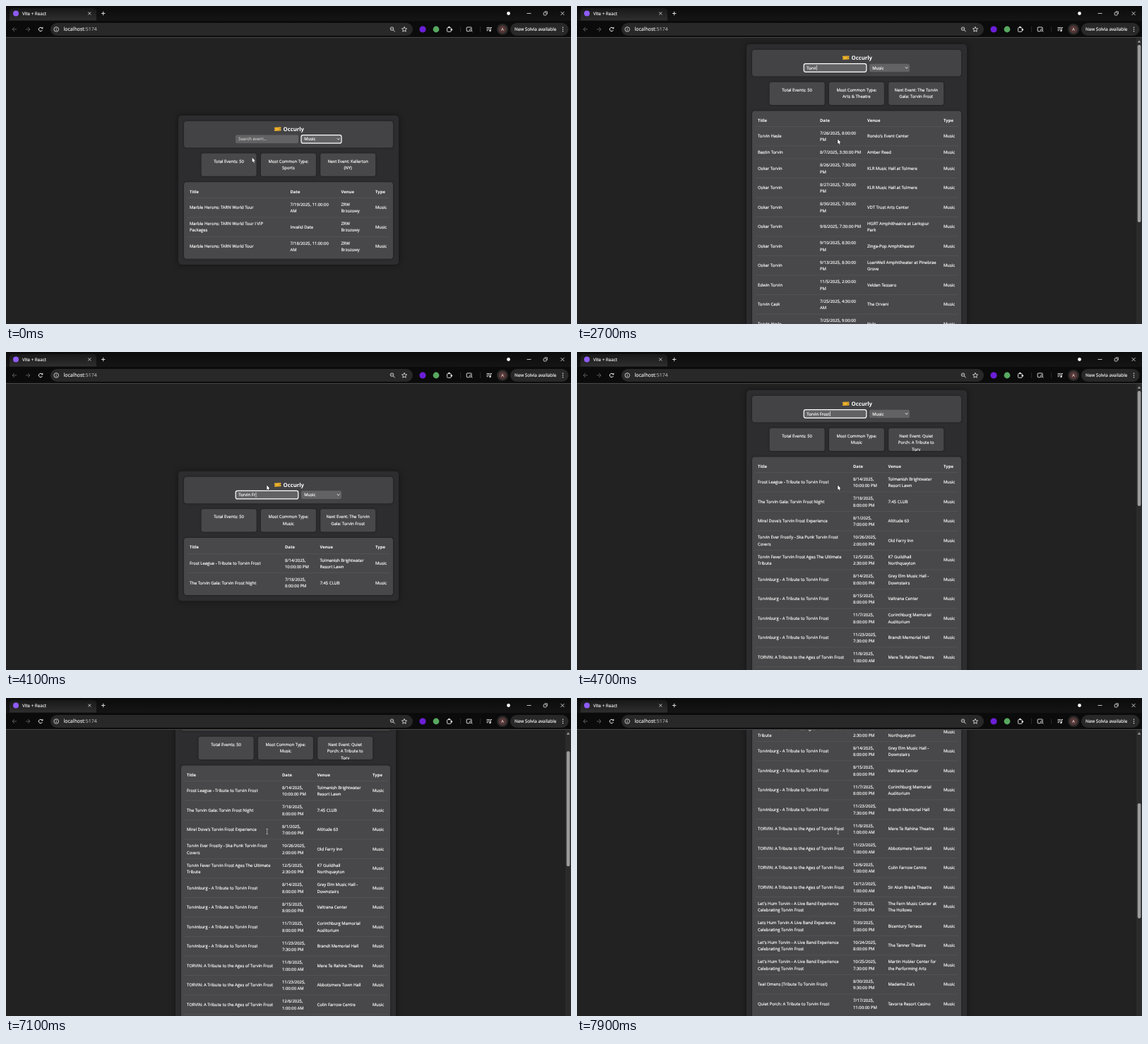
An HTML page with a canvas that plays this animation: 800x450 px, repeating every 8000 ms.

```html
<!DOCTYPE html>
<html lang="en">
<head>
<meta charset="utf-8">
<title>Event search</title>
<style>
html, body { margin: 0; width: 100%; height: 100%; overflow: hidden; background: #222; }
canvas { display: block; width: 800px; height: 450px; }
</style>
</head>
<body>
<canvas id="stage"></canvas>
<script>
const LOOP = 8000, W = 800, H = 450, BAR = 45;
const canvas = document.getElementById('stage');
const c = canvas.getContext('2d');
const dpr = window.devicePixelRatio || 1;
canvas.width = W * dpr;
canvas.height = H * dpr;

// ---------- data: title | date | venue, "~" breaks a line ----------
const fullDate = d => d.replace(/(\d+\/\d+)/, '$1/2025,').replace(/(:\d\d)/, '$1:00');

function parse(src) {
  return src.trim().split('\n').map(row => {
    const [title, date, venue] = row.trim().split('|');
    const cells = [title, fullDate(date), venue, 'Music'].map(s => s.split('~'));
    return { cells, h: cells.some(s => s.length > 1) ? 27.5 : 18 };
  });
}

const tour = 'Marble Herons: TARN World Tour';
const burg = 'Torvinburg - A Tribute to Torvin Frost';
const ages = 'TORVIN: A Tribute to the Ages of Torvin Frost';
const hum = 'Hum Torvin - A Live Band Experience~Celebrating Torvin Frost';

const startRows = parse(`
  ${tour}|7/19 11:00~AM|ZRW~Brzozowy
  ${tour} I VIP~Packages|Invalid Date|ZRW~Brzozowy
  ${tour}|7/18 11:00~AM|ZRW~Brzozowy`);

const letterRows = parse(`
  T Lunafoxy|8/22~2:30 PM|Belvarra Theatre
  Q&T|10/15~2:00 PM|Dunmorrow Depot
  Q&T|10/17~2:00 PM|Northumbria University
  Q&T|10/21~3:00 PM|The Fennel
  Q&T|10/22~2:00 PM|Loomcroft
  Q&T|10/25~2:00 PM|Harrowick Assembly Hall
  TheMURA$k|11/15~7:00 PM|The Lanternry -~Undercroft
  TheMURA$k|11/18~8:00 PM|Grey Elm Music Hall -~Upstairs
  T-Glim|7/26~8:00 PM|Wold Fair
  T-Glim|8/7 8:00~PM|East Marlovia Fairgrounds`);

const nameRows = parse(`
  Torvin Cask|7/25 4:30~AM|The Orvani
  Torvin Hasle|7/25 9:00~PM|Nyla
  Torvin Hasle|7/26 8:00~PM|Rondo's Event Center
  Bastin Torvin|8/7 3:30 PM|Amber Reed
  Oskar Torvin|8/26 7:30~PM|KLR Music Hall at Tolmere
  Oskar Torvin|8/27 7:30~PM|KLR Music Hall at Tolmere
  Oskar Torvin|8/30 7:30~PM|VDT Trust Arts Center
  Oskar Torvin|9/8 7:30 PM|HGRT Amphitheatre at Larkspur~Park
  Oskar Torvin|9/10 8:30~PM|Zinga-Pop Amphitheater
  Oskar Torvin|9/13 8:30~PM|LoanWell Amphitheater at Pinebrae~Grove
  Edwin Torvin|11/5 2:00~PM|Velden Tessaro`);

const tributeRows = parse(`
  Frost League - Tribute to Torvin Frost|8/14~10:00 PM|Tolmanish Brightwater~Resort Lawn
  The Torvin Gala: Torvin Frost Night|7/18~8:00 PM|7:45 CLUB
  Mirel Dove's Torvin Frost Experience|8/1~7:00 PM|Altitude 63
  Torvin Ever Frostly - Ska Punk Torvin Frost~Covers|10/26~2:00 PM|Old Ferry Inn
  Torvin Fever Torvin Frost Ages The Ultimate~Tribute|12/5~2:30 PM|K7 Guildhall~Northquayton
  ${burg}|8/14~8:00 PM|Grey Elm Music Hall -~Downstairs
  ${burg}|8/15~8:00 PM|Valtrana Center
  ${burg}|11/7~8:00 PM|Corinthburg Memorial~Auditorium
  ${burg}|11/23~7:30 PM|Brandt Memorial Hall
  ${ages}|11/8~1:00 AM|Mere Te Rahina Theatre
  ${ages}|11/23~1:00 AM|Abbotsmere Town Hall
  ${ages}|12/6~1:00 AM|Colin Farrow Centre
  ${ages}|12/12~1:00 AM|Sir Alun Brede Theatre
  Let's ${hum}|7/19~7:00 PM|The Fern Music Center at~The Hollows
  Lets ${hum.replace(' -', '')}|7/20~5:00 PM|Bicentury Terrace
  Let's ${hum}|10/24~8:00 PM|The Tanner Theatre
  Let's ${hum}|10/25~7:30 PM|Martin Hobler Center for~the Performing Arts
  Teal Omens (Tribute To Torvin Frost)|8/30~9:30 PM|Madame Zia's
  Quiet Porch: A Tribute to Torvin Frost|7/17~11:00 PM|Tavorra Resort Casino`);

// thumb > 0 means the page overflows and shows a scrollbar
const view = (rows, dateX, venueX, thumb = 0) => ({ rows, cols: [256, dateX, venueX, 519], thumb });
const turned = (rows, n) => [...rows.slice(n), ...rows.slice(0, n)];
const letters = n => view(turned(letterRows, n), 378, 437, 143);
const named = n => view(turned(nameRows, n), 344, 411, 251);
const pair = view(tributeRows.slice(0, 2), 391, 440.5);

const ARTS = 'Arts & Theatre', GALA = 'The Torvin~Gala: Torvin Frost';
const PORCH = 'Quiet~Porch: A Tribute to~Torv', OWL = 'T-Owl Fest';
const steps = [
  [0, '', view(startRows, 398.5, 470.5), 'Sports', 'Kellerton~(NY)'],
  [1900, 'T', letters(0), 'Music', OWL],
  [2000, 'To', letters(3), 'Music', OWL],
  [2300, 'Tor', letters(6), 'Music', OWL],
  [2500, 'Torv', named(4), ARTS, GALA],
  [2700, 'Torvi', named(2), ARTS, GALA],
  [2900, 'Torvin', named(1), ARTS, GALA],
  [3000, 'Torvin', named(0), ARTS, GALA],
  [3700, 'Torvin ', view(nameRows.slice(0, 9), 344, 411), ARTS, GALA],
  [3900, 'Torvin F', pair, 'Music', GALA],
  [4100, 'Torvin Fr', pair, 'Music', GALA],
  [4300, 'Torvin Fro', pair, 'Music', GALA],
  [4500, 'Torvin Fros', pair, 'Music', GALA],
  [4700, 'Torvin Frost', view(tributeRows, 391, 440.5, 163), 'Music', PORCH]
];
const caretOff = [[0, 1000], [1400, 1700], [3300, 3700], [5200, 5600], [5900, 6400]];
const scrollKeys = [[6200, 0], [6300, 19], [6400, 41.7], [7000, 41.7], [7100, 53], [7400, 114], [7900, 246.5], [8000, 273]];

function scrollAt(t) {
  for (let i = 1; i < scrollKeys.length; i++) {
    const [t0, a] = scrollKeys[i - 1], [t1, b] = scrollKeys[i];
    if (t < t1) return a + (b - a) * Math.max(0, (t - t0) / (t1 - t0));
  }
  return scrollKeys.at(-1)[1];
}

// ---------- drawing helpers ----------
const K = 8, BODY = 5.9;

function setFont(size, weight = 400) {
  c.font = `${weight} ${size * K}px "Open Sans", "Noto Sans", sans-serif`;
}

// y is the middle of the capitals; a hairline stroke keeps small type crisp
function text(s, x, y, { size = BODY, color = '#fff', weight = 400, align = 'left' } = {}) {
  c.save();
  c.translate(x, y + size * 0.357);
  c.scale(1 / K, 1 / K);
  setFont(size, weight);
  c.textAlign = align;
  c.fillStyle = c.strokeStyle = color;
  c.lineWidth = 0.16 * K;
  c.lineJoin = 'round';
  c.fillText(s, 0, 0);
  if (weight < 700) c.strokeText(s, 0, 0);
  c.restore();
}

function lines(list, x, y, gap, opt) {
  list.forEach((s, i) => text(s, x, y + i * gap, opt));
}

function widthOf(s, size = BODY) {
  setFont(size);
  return c.measureText(s).width / K;
}

function box(x, y, w, h, r, fill, blur = 0) {
  c.save();
  c.shadowColor = 'rgba(0,0,0,.45)';
  c.shadowBlur = blur * dpr;
  c.fillStyle = fill;
  c.beginPath();
  c.roundRect(x, y, w, h, r);
  c.fill();
  c.restore();
}

function fade(y0, y1, from, to) {
  const g = c.createLinearGradient(0, y0, 0, y1);
  g.addColorStop(0, from);
  g.addColorStop(1, to);
  return g;
}

function frame(x, y, w, h, r, color, lw) {
  c.strokeStyle = color;
  c.lineWidth = lw;
  c.beginPath();
  c.roundRect(x, y, w, h, r);
  c.stroke();
}

function path(pts, color, lw = 0.9) {
  c.beginPath();
  pts.forEach(([x, y]) => c.lineTo(x, y));
  c.strokeStyle = color;
  c.lineWidth = lw;
  c.stroke();
}

function shape(pts, fill) {
  c.beginPath();
  pts.forEach(([x, y]) => c.lineTo(x, y));
  c.closePath();
  c.fillStyle = fill;
  c.fill();
}

function dot(x, y, r, fill) {
  c.beginPath();
  c.arc(x, y, r, 0, 7);
  c.fillStyle = fill;
  c.fill();
}

function ring(x, y, r, color, lw = 0.9, from = 0, to = Math.PI * 2) {
  c.beginPath();
  c.arc(x, y, r, from, to);
  c.strokeStyle = color;
  c.lineWidth = lw;
  c.stroke();
}

function cross(x, y, r, color) {
  path([[x - r, y - r], [x + r, y + r]], color, 0.8);
  path([[x - r, y + r], [x + r, y - r]], color, 0.8);
}

// ---------- browser window ----------
function drawBrowser() {
  const ink = '#ececec', dim = '#666';
  box(0, 0, W, BAR, 0, '#0b0b0b');
  box(0, 0, W, 21, 0, fade(0, 21, '#0b0b0b', '#151515'));
  box(5, 3, 123, 17.5, [5, 5, 0, 0], fade(3, 20, '#181818', '#2e2e2e'));
  box(0, 44, W, 1, 0, '#474747');

  dot(14, 10.5, 4, '#8f5cf7');
  text('Vite + React', 23, 10.7, { size: 6.25, color: ink });
  cross(118.3, 10.5, 2, ink);
  path([[135, 10.5], [140.4, 10.5]], ink);
  path([[137.7, 7.8], [137.7, 13.2]], ink);
  dot(711.5, 10.5, 2.4, '#fff');
  path([[737.5, 10.5], [743.5, 10.5]], ink, 0.8);
  frame(761.2, 9, 4, 4, 0.8, ink, 0.8);
  path([[762.6, 7.8], [766.4, 7.8], [766.4, 11.6]], ink, 0.7);
  cross(788, 10.5, 2.5, ink);

  for (const [x, d] of [[12, 1], [31, -1]]) {
    path([[x - 3 * d, 33], [x + 3 * d, 33]], dim);
    path([[x, 30], [x - 3 * d, 33], [x, 36]], dim);
  }
  ring(49, 33, 2.7, ink, 1, 0.4, 5.5);
  shape([[49.6, 32.3], [52.3, 32.3], [52.3, 29.5]], ink);

  box(63, 24, 513, 18, 9, '#282828');
  ring(71.2, 33, 3.3, ink, 0.8);
  path([[71.2, 32.6], [71.2, 34.9]], ink, 0.8);
  dot(71.2, 31.3, 0.5, ink);
  text('localhost', 81.5, 33, { size: 7, color: '#f0f0f0' });
  text(':5174', 81.5 + widthOf('localhost', 7), 33, { size: 7, color: '#a8a8a8' });

  ring(546.5, 32.2, 2.3, ink, 0.8);
  path([[548.3, 34], [550.7, 36.4]], ink);
  path([[545.3, 32.2], [547.7, 32.2]], ink, 0.6);
  const star = [...Array(11).keys()].map(i => {
    const a = i * Math.PI / 5 - Math.PI / 2, r = i % 2 ? 1.7 : 3.8;
    return [564 + r * Math.cos(a), 33.2 + r * Math.sin(a)];
  });
  path(star, ink, 0.8);

  dot(590, 33, 4.6, '#6b1fd6');
  dot(609, 33, 4.4, '#58a860');
  frame(624.6, 30.6, 5.6, 5.8, 0.8, ink, 0.9);
  dot(627.4, 30, 1.2, ink);
  dot(630.9, 33.5, 1.2, ink);
  for (const x of [643, 671.5]) box(x, 29, 0.6, 8, 0, '#3c3c3c');
  frame(652.2, 30, 7, 5.8, 0.8, ink, 0.9);
  box(656.5, 32.5, 4.5, 4.5, 0, '#0b0b0b');
  ring(658, 34, 1.5, ink, 0.8);
  path([[659.2, 35.2], [660.5, 36.5]], ink, 0.8);
  path([[680.5, 30.5], [685.3, 30.5]], ink);
  path([[680.5, 32.6], [685.3, 32.6]], ink);
  path([[680.5, 34.7], [683, 34.7]], ink);
  path([[686.2, 35], [686.2, 30.5], [688, 30.5]], ink);
  dot(685.4, 35, 1.2, ink);

  dot(703, 33, 8, '#282828');
  dot(703, 33, 5.6, '#553737');
  text('A', 703, 33, { size: 5.6, color: '#ead9d9', align: 'center' });
  box(714, 24, 82.5, 18, 9, '#282828');
  text('New Solvia available', 720, 33, { size: 6.3, color: '#f4f4f4' });
  for (const y of [30.2, 33, 35.8]) dot(788.5, y, 0.75, ink);
}

// ---------- page ----------
function drawTicket() {
  c.save();
  c.translate(380.7, 73.2);
  c.rotate(-0.05);
  box(-4.7, -2.6, 9.4, 5.2, 0.7, '#f0b92f');
  frame(-3.4, -1.6, 5, 3.2, 0.3, '#c98a1d', 0.5);
  path([[2.7, -2.4], [2.7, 2.4]], '#a86f14', 0.5);
  dot(-4.7, 0, 0.8, '#434346');
  dot(4.7, 0, 0.8, '#434346');
  c.restore();
}

function drawForm(t, query) {
  const typing = t >= 1000, fill = '#626264';
  box(248, 62, 296, 37.5, 4, '#434346', 3);
  drawTicket();
  text('Occurly', 388.5, 73.2, { size: 7.75, weight: 700 });

  box(321, 81.7, 89, 11.6, 2.5, fill);
  box(414, 81.7, 57, 11.6, 2.5, fill);
  if (typing) frame(321.2, 81.7, 88.6, 11.6, 2.5, '#fff', 1.2);
  else frame(414, 81.7, 57, 11.6, 2.5, '#fff', 1.2);

  text(query || 'Search event...', 325.3, 87.4, { color: query ? '#fff' : '#c4c4c4' });
  if (!caretOff.some(([a, b]) => t >= a && t < b))
    box(325.8 + widthOf(query), 83.8, 0.6, 7.2, 0, '#fff');
  text('Music', 418.2, 87.4);
  path([[464.9, 86.4], [466.7, 88.2], [468.5, 86.4]], '#fff', 0.9);
}

function drawStats(common, next) {
  const cards = ['Total Events: 50', 'Most Common Type:~' + common, 'Next Event: ' + next];
  cards.forEach((s, i) => {
    const x = 272.6 + i * 84.3;
    box(x, 107.7, 78, 32.2, 3, '#48484a', 3);
    lines(s.split('~'), x + 39, 118.7, 9.5, { align: 'center' });
  });
}

function drawTable({ rows, cols }, height, top) {
  box(248, 148.4, 296, height, 4, '#48484a', 3);
  ['Title', 'Date', 'Venue', 'Type'].forEach((s, i) =>
    text(s, cols[i], 161.5, { weight: 700 }));
  let y = 170.6;
  for (const { cells, h } of rows) {
    if (y + top > 15 && y + top < H) {
      box(252.5, y - 0.25, 287, 0.5, 0, '#5c5c5e');
      cells.forEach((cell, i) =>
        lines(cell, cols[i], y + h / 2 - (cell.length - 1) * 4.6, 9.2));
    }
    y += h;
  }
}

function drawPage(t) {
  const [, query, list, common, next] = steps.findLast(s => t >= s[0]);
  const scroll = scrollAt(t), long = list.thumb > 0;
  const bodyH = list.rows.reduce((sum, r) => sum + r.h, 0);
  const cardH = long ? 1000 : 128.5 + bodyH;
  const dx = long ? 0 : 4;
  const dy = long ? -scroll : 206.4 - cardH / 2;

  c.save();
  c.beginPath();
  c.rect(0, BAR, W, H - BAR);
  c.clip();
  box(0, BAR, W, H, 0, '#222');
  c.translate(dx, dy);
  box(240, 54, 312, cardH, 5, '#2d2d2f', 9);
  drawForm(t, query);
  drawStats(common, next);
  drawTable(list, cardH - 102.6, dy);
  c.translate(-dx, -dy);
  if (long) {
    box(792, BAR, 8, H, 0, '#2b2b2b');
    shape([[793.6, 51.8], [798.4, 51.8], [796, 48.4]], '#9c9c9c');
    box(793.7, 55 + scroll * 0.381, 4.7, list.thumb, 2.3, '#9c9c9c');
  }
  c.restore();
}

function drawPointer(t) {
  const p = Math.min(1, t / 900), e = p * p * (3 - 2 * p);
  const x = 348.6 + 20.6 * e, y = 214.6 - 26 * e;
  const beam = t >= 6700 || (t < 1900 && y < 194);
  if (beam) {
    path([[x + 0.5, y - 3], [x + 0.5, y + 3.6]], '#d8d8d8', 0.6);
    for (const v of [-3.2, 3.8]) path([[x - 0.8, y + v], [x + 1.8, y + v]], '#d8d8d8', 0.6);
    return;
  }
  const arrow = [[0, 0], [0, 6.4], [1.4, 5.1], [2.4, 7.4], [3.4, 7], [2.4, 4.8], [4.4, 4.7], [0, 0]]
    .map(([a, b]) => [x + a, y + b]);
  path(arrow, '#111', 0.9);
  shape(arrow, '#fff');
}

const begin = performance.now();

function draw() {
  const t = Math.floor((performance.now() - begin) % LOOP / 100) * 100; // ten pictures a second
  c.setTransform(dpr, 0, 0, dpr, 0, 0);
  c.textRendering = 'geometricPrecision';
  drawPage(t);
  drawBrowser();
  drawPointer(t);
  requestAnimationFrame(draw);
}

draw();
</script>
</body>
</html>
```
